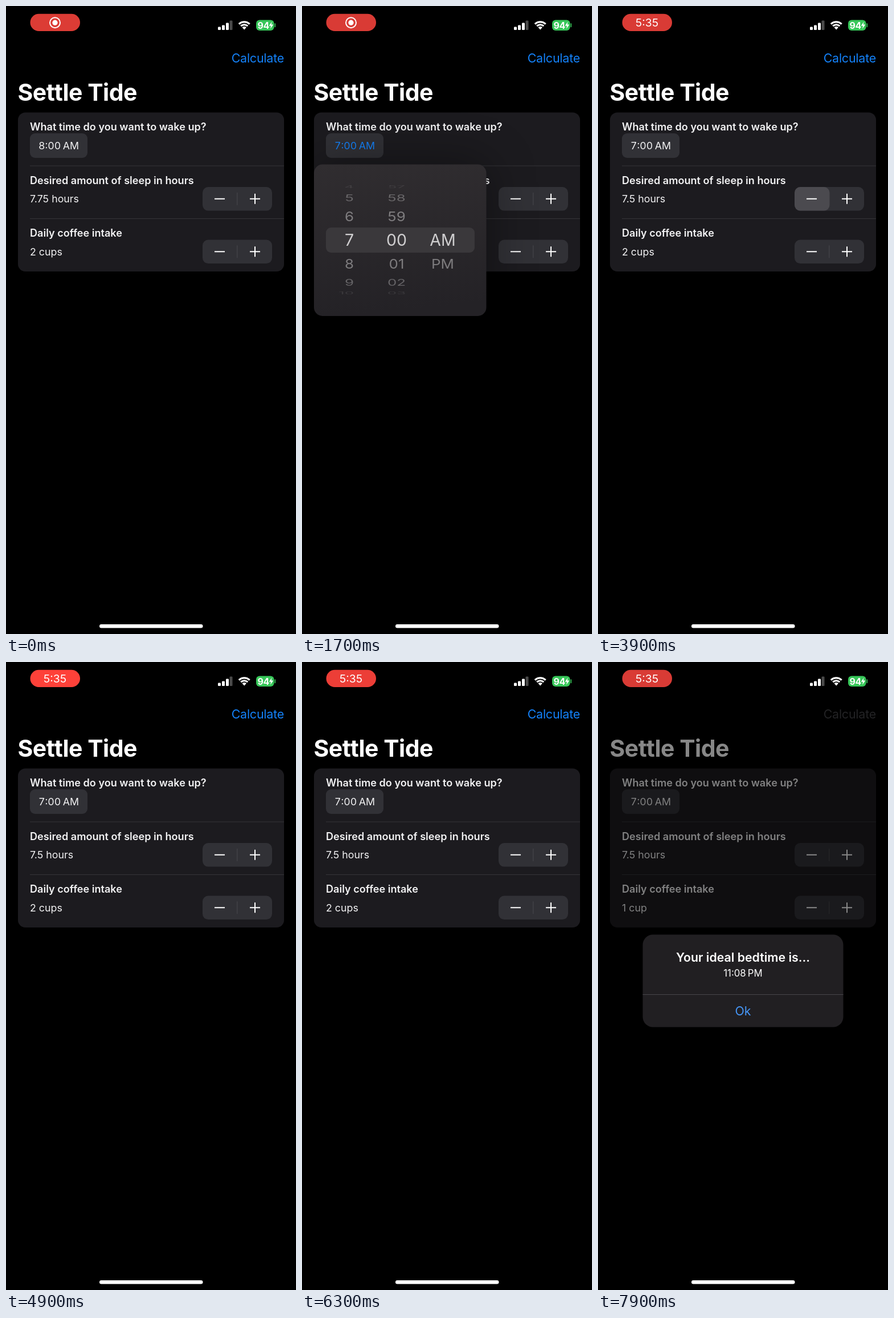
Write an HTML page that moves like this. It is 509 px wide and 1100 px high and loops after 8 s.

```html
<!DOCTYPE html>
<html lang="en">
<head>
<meta charset="utf-8">
<title>Bedtime calculator</title>
<style>
  html, body { margin: 0; width: 100%; height: 100%; overflow: hidden; background: #000; }
  svg { display: block; width: 100%; height: 100%; }
  text { font-family: Inter, Roboto, "Liberation Sans", sans-serif; fill: #fff; white-space: pre; }
  .label { font-size: 18.1px; font-weight: 600; fill: #f2f2f3; }
  .value { font-size: 17.8px; fill: #f2f2f3; }
  .wheel { font-size: 28.5px; fill: #e4e3e4; }
  .mid { text-anchor: middle; }
  .end { text-anchor: end; }
  #wake { font-variant-numeric: tabular-nums; }
  #popover { filter: drop-shadow(0 0 42px rgba(0, 0, 0, .4)); }
</style>
</head>
<body>
<svg viewBox="0 0 509 1100">
  <defs>
    <linearGradient id="sheet" x1="0" y1="0" x2="0.1" y2="1">
      <stop offset="0" stop-color="#302d30"/>
      <stop offset="1" stop-color="#242226"/>
    </linearGradient>
  </defs>
  <rect width="509" height="1100"/>

  <text x="20.5" y="166" font-size="41" font-weight="700" letter-spacing="-0.5">Settle Tide</text>
  <rect x="21" y="186.5" width="467" height="278.5" rx="13" fill="#1c1b1f"/>
  <path d="M42 280H488M42 372.5H488" stroke="#353438"/>
  <text class="label" x="42" y="218">What time do you want to wake up?</text>
  <rect x="42" y="223" width="101" height="43" rx="9" fill="#313136"/>
  <text class="value mid" id="wake" x="92.5" y="250.6"></text>
  <text class="label" x="42" y="312">Desired amount of sleep in hours</text>
  <text class="value" id="hours" x="42" y="344"></text>
  <text class="label" x="42" y="404.2">Daily coffee intake</text>
  <text class="value" id="cups" x="42" y="436.6"></text>
  <g id="steppers"></g>

  <g id="popover">
    <rect x="21" y="277.5" width="302.5" height="265.5" rx="15" fill="url(#sheet)"/>
    <rect x="42" y="388" width="261" height="44" rx="9" fill="#3a383b"/>
    <g id="wheels"></g>
  </g>

  <rect id="dim" width="509" height="1100"/>
  <text class="end" id="calculate" x="488" y="98.5" font-size="21.4" letter-spacing="-0.2">Calculate</text>

  <g id="alert">
    <rect x="78.5" y="477.5" width="352" height="162" rx="18" fill="#211f22"/>
    <path d="M78.5 582.5H430.5" stroke="#47464a"/>
    <text class="mid" x="254.5" y="524.5" font-size="21.3" font-weight="600">Your ideal bedtime is...</text>
    <text class="mid" id="bedtime" x="254.5" y="551" font-size="16.8"></text>
    <text class="mid" x="254.5" y="619" font-size="21.4" style="fill:#4596f7">Ok</text>
  </g>

  <rect id="pill" x="42.5" y="13.8" width="87.5" height="30.2" rx="15.1"/>
  <g id="recording">
    <circle cx="86" cy="29.2" r="9" fill="none" stroke="#fff" stroke-width="2"/>
    <circle cx="86" cy="29.2" r="4.6" fill="#fff"/>
  </g>
  <text class="mid" id="clock" x="86" y="36.2" font-size="19.3">5:35</text>

  <g fill="#fff">
    <rect x="372" y="36.5" width="5" height="5.5" rx="1.3"/>
    <rect x="379" y="33.5" width="5" height="8.5" rx="1.3"/>
    <rect x="386" y="29.5" width="5" height="12.5" rx="1.3"/>
    <rect x="392.5" y="25.5" width="5" height="16.5" rx="1.3" fill="#4a4a4a"/>
    <path d="M418.2 41.5L414.5 37.5A5.4 5.4 0 0 1 421.9 37.5Z"/>
  </g>
  <path d="M408.8 31.6A13.5 13.5 0 0 1 427.6 31.6M412.2 35.2A8.6 8.6 0 0 1 424.2 35.2" fill="none" stroke="#fff" stroke-width="3.2"/>
  <rect x="439" y="24.5" width="31.5" height="18.5" rx="6" fill="#37c759"/>
  <path d="M472.3 31V36.5" stroke="#37c759" stroke-width="1.6" stroke-linecap="round"/>
  <text x="441.5" y="39.7" font-size="16" font-weight="700" letter-spacing="-0.3">94</text>
  <path d="M466.6 27.5L461.6 34.8H465L464 40L469.2 32.6H465.6Z" fill="#fff"/>
  <rect x="164" y="1083" width="181.5" height="6.5" rx="3.25" fill="#fff"/>
</svg>
<script>
const NS = 'http://www.w3.org/2000/svg';
const LOOP = 8000, TICK = 100;
const BLUE = [20, 130, 250], DISABLED = [35, 35, 37];
const $ = id => document.getElementById(id);

function add(parent, tag, attrs) {
  const el = parent.appendChild(document.createElementNS(NS, tag));
  for (const key in attrs) el.setAttribute(key, attrs[key]);
  return el;
}

const clamp = x => Math.min(1, Math.max(0, x));
const mix = (a, b, p) => a + (b - a) * p;
const mixColor = (a, b, p) => `rgb(${a.map((v, i) => Math.round(mix(v, b[i], p)))})`;
const progress = (t, start, length) => clamp((t - start) / length);
const easeOut = p => 1 - (1 - p) ** 3;
const easeInOut = p => p * p * (3 - 2 * p);
const within = (t, start, end) => t >= start && t < end;

function scaleAbout(el, x, y, s) {
  el.setAttribute('transform', `translate(${x} ${y}) scale(${s}) translate(${-x} ${-y})`);
}

function makeStepper(cy) {
  const g = add($('steppers'), 'g', { transform: `translate(345 ${cy})` });
  add(g, 'rect', { y: -20.8, width: 122, height: 41.6, rx: 10, fill: '#313136' });
  const divider = add(g, 'path', { d: 'M60.8 -11V11', stroke: '#4b4a4f' });
  const key = add(g, 'rect', { y: -20.8, width: 61.5, height: 41.6, rx: 10, fill: '#4b4a4f' });
  add(g, 'path', { d: 'M21 0H39M83 0H101M92 -9V9', stroke: '#fff', 'stroke-width': 2 });
  return (minus, plus) => {
    key.setAttribute('x', plus ? 60.5 : 0);
    key.setAttribute('opacity', +(minus || plus));
    divider.setAttribute('opacity', +!(minus || plus));
  };
}
const sleepStepper = makeStepper(337.8);
const coffeeStepper = makeStepper(430.3);

// Each column lies on a cylinder; offset counts rows from the middle.
function makeColumn(labels, x, align) {
  const items = labels.map(label => {
    const el = add($('wheels'), 'text', { class: 'wheel ' + align });
    el.textContent = label;
    return el;
  });
  return position => items.forEach((el, i) => {
    const offset = i - position, distance = Math.abs(offset);
    const angle = offset * 0.445;
    const size = mix(1, 0.91, clamp(distance));
    const squash = Math.max(0, Math.cos(angle));
    const fade = distance < 1 ? mix(0.88, 0.45, distance)
      : distance < 2 ? mix(0.45, 0.33, distance - 1)
      : mix(0.33, 0.1, clamp(distance - 2));
    el.setAttribute('opacity', distance > 3.3 ? 0 : fade);
    el.setAttribute('transform',
      `translate(${x} ${410 + 95.4 * Math.sin(angle)}) scale(${size} ${size * squash}) translate(0 10.3)`);
  });
}
const hourColumn = makeColumn(['3', '4', '5', '6', '7', '8', '9', '10', '11', '12'], 91, 'end');
makeColumn(['57', '58', '59', '00', '01', '02', '03'], 166, 'mid')(3);
makeColumn(['AM', 'PM'], 247, 'mid')(0);

function drawPopover(t) {
  const sinceOpen = Math.max(0, t - 200) / 1000;
  const close = easeInOut(progress(t, 1700, 400));
  const spring = 1 - Math.exp(-11 * sinceOpen) * Math.cos(9 * sinceOpen);
  const shown = progress(t, 200, 200) * (1 - close);
  $('popover').setAttribute('opacity', shown);
  scaleAbout($('popover'), 92, 270, mix(0.2, 1, spring) * mix(1, 0.25, close));
  hourColumn(mix(5, 4, easeInOut(progress(t, 900, 500))));
  $('wake').textContent = (t < 1400 ? '8' : '7') + ':00\u2009AM';
  $('wake').style.fill = within(t, 200, 1800) ? mixColor(BLUE, BLUE, 0) : '#f2f2f3';
}

function drawSteppers(t) {
  const hours = t < 2300 ? 7.75 : t < 3700 ? 8 : t < 3900 ? 7.75 : 7.5;
  $('hours').textContent = hours + ' hours';
  $('cups').textContent = t < 6500 ? '2 cups' : '1 cup';
  sleepStepper(within(t, 3700, 3800) || within(t, 3900, 4000), within(t, 2300, 2400));
  coffeeStepper(within(t, 6500, 6700), false);
}

function drawAlert(t) {
  const start = t < 6400 ? 4900 : 7300;
  const enter = easeOut(progress(t, start, 500));
  const leave = t < 6400 ? easeInOut(progress(t, 5800, 400)) : 0;
  const shown = enter * (1 - leave);
  $('dim').setAttribute('opacity', 0.47 * shown);
  $('alert').setAttribute('opacity', shown);
  scaleAbout($('alert'), 254.5, 558.5, mix(1.1, 1, enter));
  $('bedtime').textContent = (t < 6400 ? '10:54' : '11:08') + '\u2009PM';
  $('calculate').style.fill = mixColor(BLUE, DISABLED, shown);
}

function drawPill(t) {
  const pulse = (1 - Math.cos(2 * Math.PI * (t - 1800) / 2000)) / 2;
  $('pill').setAttribute('fill', mixColor([216, 59, 53], [255, 65, 57], pulse));
  const swap = progress(t, 2100, 200);
  $('recording').setAttribute('opacity', 1 - swap);
  $('clock').setAttribute('opacity', swap);
}

function draw(t) {
  drawPopover(t);
  drawSteppers(t);
  drawAlert(t);
  drawPill(t);
}

let origin;
function tick(now) {
  origin ??= now;
  draw(Math.floor((now - origin) % LOOP / TICK) * TICK);
  requestAnimationFrame(tick);
}
draw(0);
requestAnimationFrame(tick);
</script>
</body>
</html>
```
